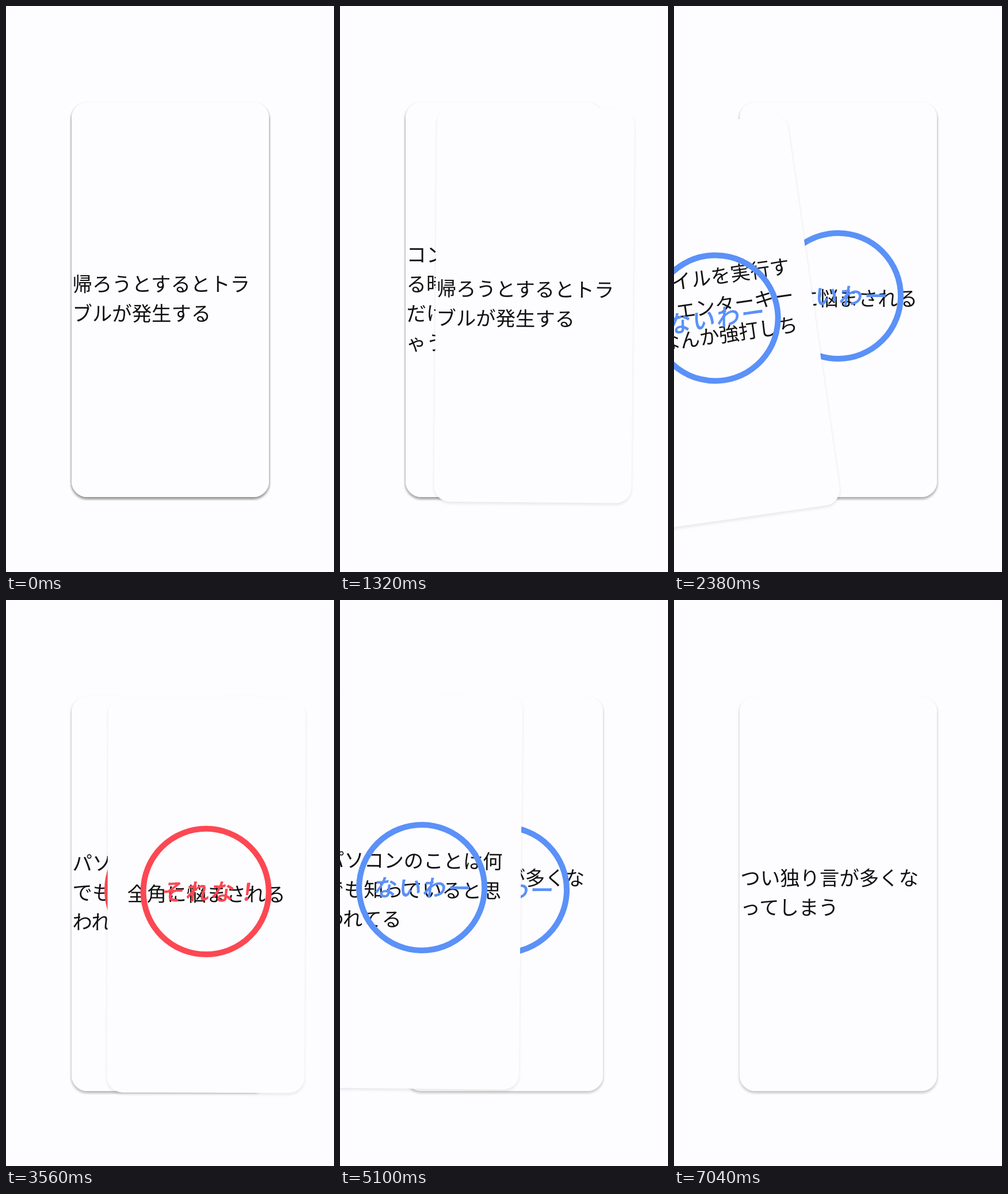
These frames come from a looping animation (570x982 px, 7.14 s). An HTML page:

```html
<!DOCTYPE html>
<html lang="ja">
<head>
<meta charset="utf-8">
<style>
  html, body { margin: 0; width: 100%; height: 100%; overflow: hidden; background: #fdfdff; }
  #stage { position: relative; width: 570px; height: 982px; overflow: hidden; }
  .card {
    position: absolute; left: 114px; top: 167px; width: 343px; height: 685px;
    border-radius: 27px; background: #fdfdff;
    box-shadow: 0 3px 5px rgba(20, 20, 10, .095);
  }
  p, text { font-family: "Noto Sans CJK JP", "Noto Sans CJK", sans-serif; }
  p {
    position: absolute; inset: -4px 0 4px; margin: 0;
    display: flex; align-items: center; justify-content: center;
    font-size: 34.4px; font-weight: 300; line-height: 51px;
    color: #111; white-space: pre;
  }
  p.wide { justify-content: flex-start; padding-left: 1.5px; }
  svg {
    position: absolute; left: 51px; top: 215.5px; width: 240px; height: 240px;
    visibility: hidden;
  }
  circle { fill: none; stroke: var(--ink); stroke-width: 10; }
  text {
    font-size: 40px; letter-spacing: 3px; text-anchor: middle;
    fill: var(--ink); stroke: var(--ink); stroke-width: 1.4; stroke-linejoin: round;
  }
  .no { --ink: #5b91f8; }
  .yes { --ink: #fc4853; }
  .left .no, .right .yes { visibility: visible; }
</style>
</head>
<body>
<div id="stage"></div>
<script>
const LOOP = 7140;
const THROW_TIME = 300;
const THRESHOLD = 60;
const SPARE_CARDS = 2;

// A drag lasts from..to (ms) and swings sideways by reach px;
// swing counts quarter turns, pace slows the start, sink and bend shape the fall.
const CARDS = [
  { text: "帰ろうとするとトラ\nブルが発生する",
    drag: { from: 20, to: 1720, reach: 215, swing: 2.41, sink: 12 } },
  { text: "コンパイルを実行す\nる時、エンターキー\nだけなんか強打しち\nゃう",
    drag: { from: 2080, to: 2520, reach: -241.5, sink: 56 } },
  { text: "全角に悩まされる",
    drag: { from: 3030, to: 4120, reach: 200, pace: 2.22, sink: 2, bend: 8 } },
  { text: "パソコンのことは何\nでも知っていると思\nわれてる",
    drag: { from: 4580, to: 5900, reach: -246, sink: -37, bend: 68 } },
  { text: "つい独り言が多くな\nってしまう" }
];

const stamp = (name, words, x) =>
  `<svg class="${name}" viewBox="-120 -120 240 240"><circle r="109"/>
   <text x="${x}" y="15" transform="skewX(-8)">${words}</text></svg>`;
const STAMPS = stamp("no", "ないわー", 3) + stamp("yes", "それな！", 9);

const stage = document.getElementById("stage");

function addCard(html) {
  const el = document.createElement("div");
  el.className = "card";
  el.innerHTML = html;
  stage.append(el);
  return el;
}

for (let i = 0; i < SPARE_CARDS; i++) addCard("");
[...CARDS].reverse().forEach(card => {
  const wide = card.text.includes("\n") ? "wide" : "";
  card.el = addCard(`<p class="${wide}">${card.text}</p>${STAMPS}`);
});

const clamp01 = v => Math.max(0, Math.min(1, v));

function pose({ from, to, reach, swing = 1, pace = 1, sink, bend = 0 }, t) {
  const u = clamp01((t - from) / (to - from));
  const x = reach * Math.sin(Math.PI / 2 * swing * u ** pace);
  const y = u * (sink + bend * u);
  const fly = clamp01((t - to) / THROW_TIME);
  return {
    x: x + Math.sign(x) * 480 * fly ** 2,
    y: y + 60 * fly ** 2,
    tilt: x * y / 1000,
    gone: fly === 1
  };
}

function draw(t) {
  let side = "";
  for (const { el, drag } of CARDS) {
    if (!drag) continue;
    const { x, y, tilt, gone } = pose(drag, t);
    el.style.display = gone ? "none" : "";
    el.style.transform = x || y ? `translate(${x}px, ${y}px) rotate(${tilt}deg)` : "none";
    if (!gone && Math.abs(x) > THRESHOLD) side = x < 0 ? "left" : "right";
  }
  stage.className = side;
}

const start = performance.now();
function tick() {
  draw((performance.now() - start) % LOOP);
  requestAnimationFrame(tick);
}
tick();
</script>
</body>
</html>
```
